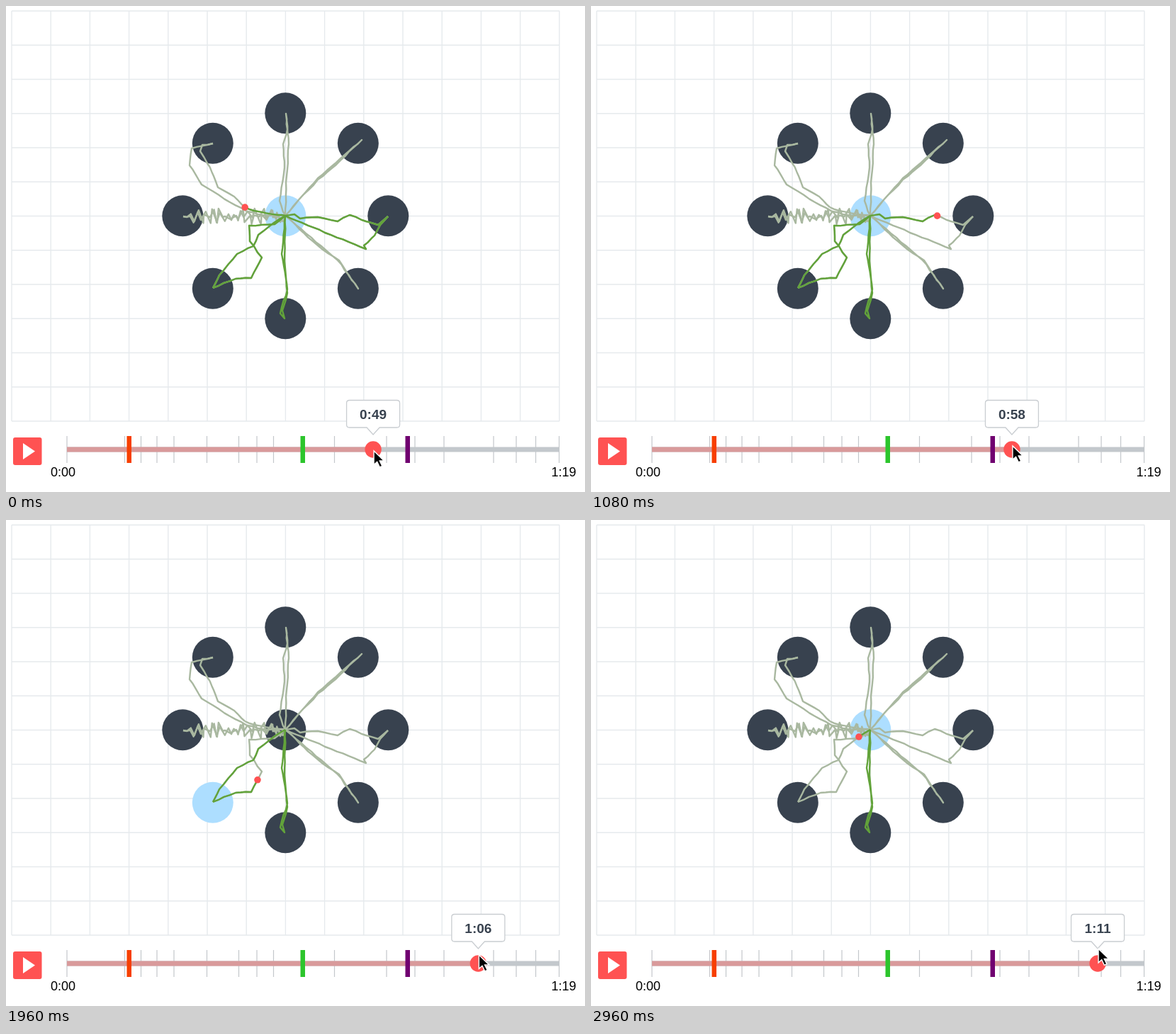
Animation of 817 by 686 pixels, one loop 3000 ms. Source, as an HTML page:

```html
<!DOCTYPE html>
<html lang="en">
<head>
<meta charset="utf-8">
<title>Reach trial playback</title>
<style>
  html, body { margin: 0; width: 100%; height: 100%; overflow: hidden; background: #fff; }
  svg { display: block; }
  text { font-family: "Liberation Sans", Arial, sans-serif; text-anchor: middle; }
  polyline { fill: none; stroke-width: 2.4; stroke-linejoin: round; }
  .past { stroke: #a9b8a0; }
  .next { stroke: #62a33a; }
  #grid, #ticks { fill: none; stroke: #e6eaed; stroke-width: 1.4; }
  #ticks { stroke: #c3c7cb; stroke-width: 1.2; }
</style>
</head>
<body>
<svg width="817" height="686" viewBox="0 0 817 686">
  <path id="grid"/>
  <g id="targets"></g>
  <g id="traces"></g>
  <circle id="dot" r="4.8" fill="#ff5252"/>

  <rect x="10" y="609" width="40.5" height="39" rx="3" fill="#ff5252"/>
  <path d="M24 617L41 628.5L24 640Z" fill="#fff"/>
  <path id="ticks"/>
  <rect x="86" y="622.5" width="695" height="7" fill="#c3c8cc"/>
  <rect id="played" x="86" y="622.5" height="7" fill="#d99a9b"/>
  <rect x="170.5" y="607" width="6.5" height="38" fill="#f73f00"/>
  <rect x="415.5" y="607" width="6.5" height="38" fill="#2cc52c"/>
  <rect x="563.5" y="607" width="6.5" height="38" fill="#700070"/>
  <text x="80.5" y="663.5" font-size="18">0:00</text>
  <text x="787" y="663.5" font-size="18">1:19</text>

  <g id="handle">
    <circle cy="626" r="11.7" fill="#ff5252"/>
    <path d="M-33.5 556.5H33.5Q37.5 556.5 37.5 560.5V591Q37.5 595 33.5 595H9L0 605L-9 595H-33.5Q-37.5 595 -37.5 591V560.5Q-37.5 556.5 -33.5 556.5Z" fill="#fff" stroke="#c9cdd1" stroke-width="1.3"/>
    <text id="clock" y="583" font-size="19" font-weight="bold" fill="#38424f"></text>
  </g>
  <path id="cursor" d="M0 0V19.5L4.6 15.4L8.3 23L11.8 21.4L8.2 14H14.4Z" stroke="#fff" stroke-width="1.4"/>
</svg>
<script>
const LOOP = 3000, LEFT = 86, SECONDS_PER_PX = .11342, CENTER = 8;

const $ = id => document.getElementById(id);
const add = (parent, tag, attrs) => {
  const el = document.createElementNS("http://www.w3.org/2000/svg", tag);
  for (const k in attrs) el.setAttribute(k, attrs[k]);
  return parent.appendChild(el);
};
const range = n => Array.from({ length: n }, (_, i) => i);
const clamp = v => Math.min(1, Math.max(0, v));
const mix = (a, b, k) => a + (b - a) * k;

let seed = 7;
const random = () => (seed = seed * 16807 % 2147483647) / 2147483647;
const jitter = size => (random() * 2 - 1) * size;

// Joins key points with a slightly shaky hand.
function shaky(keys) {
  const pts = keys.split(" ").map(p => p.split(",").map(Number));
  const out = [pts[0]];
  for (let i = 1; i < pts.length; i++) {
    const [a, b] = pts[i - 1], [c, d] = pts[i];
    const n = Math.ceil(Math.hypot(c - a, d - b) / 10);
    for (let j = 1; j < n; j++) out.push([mix(a, c, j / n) + jitter(.7), mix(b, d, j / n) + jitter(.7)]);
    out.push([c, d]);
  }
  return out.join(" ");
}

// A tremor between two x positions, calm at the outer end.
const tremor = (from, to) => range(29).map(i => {
  const x = mix(from, to, i / 28), size = 12 * clamp((x - 254) / 14);
  return [x + jitter(size / 4), 297 + (i % 2 ? 1 : -1) * size * random()];
}).join(" ");

const trace = (cls, points) => add($("traces"), "polyline", { class: cls, points, pathLength: 1 });

[
  "394,296 386,275 393,228 391,195 397,174 395,152 399,195 396,240 394,296",
  "394,296 440,243 478,210 502,189 466,224 440,245 394,296",
  "394,296 440,338 470,359 497,399 484,380 467,358 394,296",
  "394,296 362,295 340,290 316,277 276,252 259,225 262,201 292,194",
  "292,194 277,196 274,205 284,222 293,240 299,256 322,269 337,284"
].forEach(keys => trace("past", shaky(keys)));
trace("past", tremor(394, 250));
trace("past", tremor(250, 394));

// Each reach: highlighted target, slider x where that cue ends, slider x range of the movement, key points.
const reaches = [
  [CENTER, 537, 518, 545, "337,284 350,289 384,295 394,296"],
  [0, 577, 550, 576.5, "394,296 450,320 508,343 505,338 520,324 528,309 539,297"],
  [CENTER, 618, 581, 616.5, "539,297 525,309 508,304 485,295 468,304 440,298 415,300 407,294 394,296"],
  [3, 688, 634, 687, "394,296 379,308 343,310 344,332 361,355 346,384 324,385 292,398"],
  [CENTER, 720, 691, 718.5, "292,398 301,380 326,350 349,339 356,323 378,306 394,296"]
].map(([target, until, from, to, keys]) => ({ target, until, from, to, points: shaky(keys) }));
reaches.forEach(r => trace("past", r.points));
reaches.forEach(r => r.line = trace("next", r.points));
trace("next", shaky("394,296 389,350 397,400 387,434 393,441 390,430 397,405 393,360 394,296"));

const grid = range(15).map(i => `M${8 + i * 55.2} 7V586`).concat(range(13).map(i => `M8 ${7 + i * 48.25}H781`));
$("grid").setAttribute("d", grid.join(""));
const ticks = [86, 167.5, 190.5, 213, 237, 283.5, 328.5, 354, 377.5, 463.5, ...reaches.map(r => r.until), 747.5, 780.5];
$("ticks").setAttribute("d", ticks.map(x => `M${x} 607V645`).join(""));

// Ring targets run clockwise from the right; the last one is the centre.
const targets = range(9).map(i => {
  const r = i < CENTER ? 145 : 0, a = i * Math.PI / 4;
  return add($("targets"), "circle", { cx: 394.3 + r * Math.cos(a), cy: 296.3 + r * Math.sin(a), r: 29 });
});

// The hand's drag as [time, slider x].
const drag = [[0, 518], [300, 539.5], [540, 564], [800, 576], [1380, 613], [1620, 631], [2160, 687], [2700, 709], [2960, 715]];
function sliderX(t) {
  const i = Math.max(1, drag.findIndex(([time]) => t < time));
  if (t >= drag[drag.length - 1][0]) return drag[drag.length - 1][1];
  const [t0, x0] = drag[i - 1], [t1, x1] = drag[i];
  return mix(x0, x1, (t - t0) / (t1 - t0));
}

function draw(now) {
  const t = now % LOOP, x = sliderX(t);
  const { target } = reaches.find(r => x < r.until);
  targets.forEach((c, i) => c.setAttribute("fill", i === target ? "#addeff" : "#38424f"));

  for (const { from, to, line } of reaches) {
    const done = clamp((x - from) / (to - from));
    line.setAttribute("stroke-dasharray", `0 ${done} 2`);
    if (x < from) continue;
    const pos = line.getPointAtLength(done * line.getTotalLength());
    $("dot").setAttribute("cx", pos.x);
    $("dot").setAttribute("cy", pos.y);
  }

  const s = Math.round((x - LEFT) * SECONDS_PER_PX);
  $("clock").textContent = `${Math.floor(s / 60)}:${String(s % 60).padStart(2, "0")}`;
  $("played").setAttribute("width", x - LEFT);
  $("handle").setAttribute("transform", `translate(${x})`);
  $("cursor").setAttribute("transform", `translate(${x + 1} ${628 - 23 * (t / LOOP) ** 1.15})`);
}

const start = performance.now();
function tick() {
  draw(performance.now() - start);
  requestAnimationFrame(tick);
}
tick();
</script>
</body>
</html>
```
